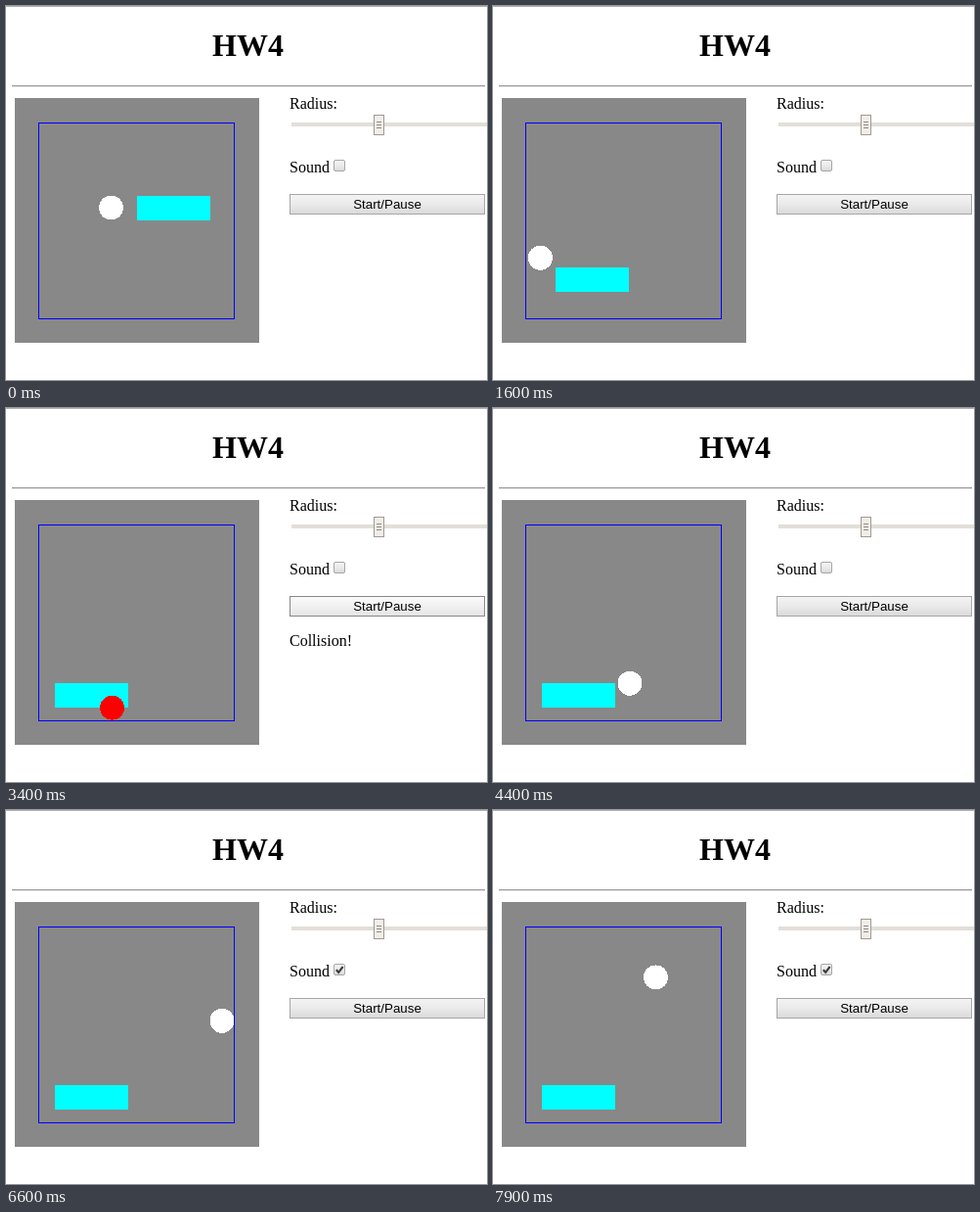
Recreate the animation shown at these times as an HTML page. Size 492x382 px, loop 8 s.

```html
<!DOCTYPE html>
<html lang="en">
<head>
<meta charset="utf-8">
<title>HW4</title>
<style>
  html, body { margin: 0; width: 100%; height: 100%; overflow: hidden; background: #fff; }
  svg { display: block; width: 492px; height: 382px; }
  text { font: 16px "Liberation Serif", "Times New Roman", serif; }
  .title { font-size: 32px; font-weight: bold; }
  .label { font: 13.333px "Liberation Sans", Arial, sans-serif; }
  .crisp { shape-rendering: crispEdges; }
</style>
</head>
<body>
<svg viewBox="0 0 492 382" xmlns="http://www.w3.org/2000/svg">
  <defs>
    <linearGradient id="face" x2="0" y2="1">
      <stop offset="0" stop-color="#f4f4f4"/>
      <stop offset=".45" stop-color="#ebebeb"/>
      <stop offset="1" stop-color="#dadada"/>
    </linearGradient>
    <linearGradient id="faceHover" x2="0" y2="1">
      <stop offset="0" stop-color="#fafafa"/>
      <stop offset=".45" stop-color="#f2f2f2"/>
      <stop offset="1" stop-color="#e4e4e4"/>
    </linearGradient>
  </defs>
  <rect width="492" height="382" fill="#fff"/>
  <g class="crisp">
    <rect width="492" height="1" fill="#b0b0b0"/>
    <rect x="6" y="81" width="484" height="1" fill="#9a9a9a"/>
    <rect x="6" y="82" width="484" height="1" fill="#e2e2e2"/>
  </g>
  <text class="title" x="247.5" y="51" text-anchor="middle">HW4</text>

  <g class="crisp">
    <rect x="9" y="94" width="250" height="250" fill="#888"/>
    <rect x="33.5" y="119.5" width="200" height="200" fill="none" stroke="#00f"/>
    <rect id="block" width="75" height="25" fill="#0ff"/>
    <circle id="ball"/>
  </g>

  <text x="290" y="105">Radius:</text>
  <rect class="crisp" x="292" y="119" width="200" height="4" fill="#e2ded8"/>
  <g id="thumb" class="crisp">
    <rect x="376.5" y="111.5" width="10" height="20" fill="#f0ede8" stroke="#a09a92"/>
    <path d="M379 118.5h5M379 121.5h5M379 124.5h5" stroke="#8e8982"/>
  </g>

  <text x="290" y="170">Sound</text>
  <rect x="335.5" y="157.5" width="11" height="11" rx="1.5" fill="url(#face)" stroke="#a6a6a6"/>
  <path id="check" d="M337.8 163.2L340.2 165.8L344.6 160" fill="none" stroke="#3c3c3c" stroke-width="2.1"/>

  <rect id="button" x="290.5" y="192.5" width="199" height="20"/>
  <text class="label" x="390" y="207" text-anchor="middle">Start/Pause</text>
  <text id="message" x="290" y="243">Collision!</text>
</svg>
<script>
const LOOP = 8000, STEP = 100;
const START = { x: 107.5, y: 206 };
const WALL = { left: 46.5, right: 221, bottom: 306.5 };
const SLOPE = 0.814;
const RADIUS = 12.5;

const el = Object.fromEntries(
  ["block", "ball", "thumb", "check", "button", "message"].map(id => [id, document.getElementById(id)]));

const clamp = (v, lo, hi) => Math.max(lo, Math.min(hi, v));
const mix = (a, b, p) => a + (b - a) * p;
const progress = (t, from, to) => clamp((t - from) / (to - from), 0, 1);

function set(node, attrs) {
  for (const name in attrs) node.setAttribute(name, attrs[name]);
}

const show = (node, on) => set(node, { visibility: on ? "visible" : "hidden" });

// Horizontal distance covered; the ball is slower while it crosses the block.
function travel(t) {
  return 41 * progress(t, 0, 1000)
    + 47.5 * progress(t, 1000, 2300)
    + 66 * progress(t, 2300, 4400)
    + 81 * progress(t, 4400, 6600)
    + 54.5 * progress(t, 6600, 7900);
}

// Reflect the straight path at the walls.
function ballAt(t) {
  const s = travel(t);
  const fromLeft = Math.abs(START.x - WALL.left - s);
  const width = WALL.right - WALL.left;
  return {
    x: WALL.left + width - Math.abs(width - fromLeft),
    y: WALL.bottom - Math.abs(WALL.bottom - START.y - s * SLOPE)
  };
}

function render(time) {
  const t = Math.floor(time / STEP) * STEP;
  const { x: cx, y: cy } = ballAt(t);
  const r = RADIUS - 5.5 * Math.max(0, 1 - Math.abs(t - 7200) / 350);
  const drag = progress(t, 1100, 1700);
  const x = Math.round(mix(134, 50, drag)), y = Math.round(mix(194, 281, drag));
  const hit = Math.hypot(cx - clamp(cx, x, x + 75), cy - clamp(cy, y, y + 25)) < r;
  const hover = t >= 3200 && t < 4100;

  set(el.block, { x, y });
  set(el.ball, { cx, cy, r, fill: hit ? "#f00" : "#fff" });
  set(el.thumb, { transform: `translate(${Math.round((r - RADIUS) * 8.44)})` });
  set(el.button, { fill: `url(#${hover ? "faceHover" : "face"})`, stroke: hover ? "#888" : "#a6a6a6" });
  show(el.message, hit);
  show(el.check, t >= 5000);
}

const start = performance.now();
function tick() {
  render((performance.now() - start) % LOOP);
  requestAnimationFrame(tick);
}
tick();
</script>
</body>
</html>
```
